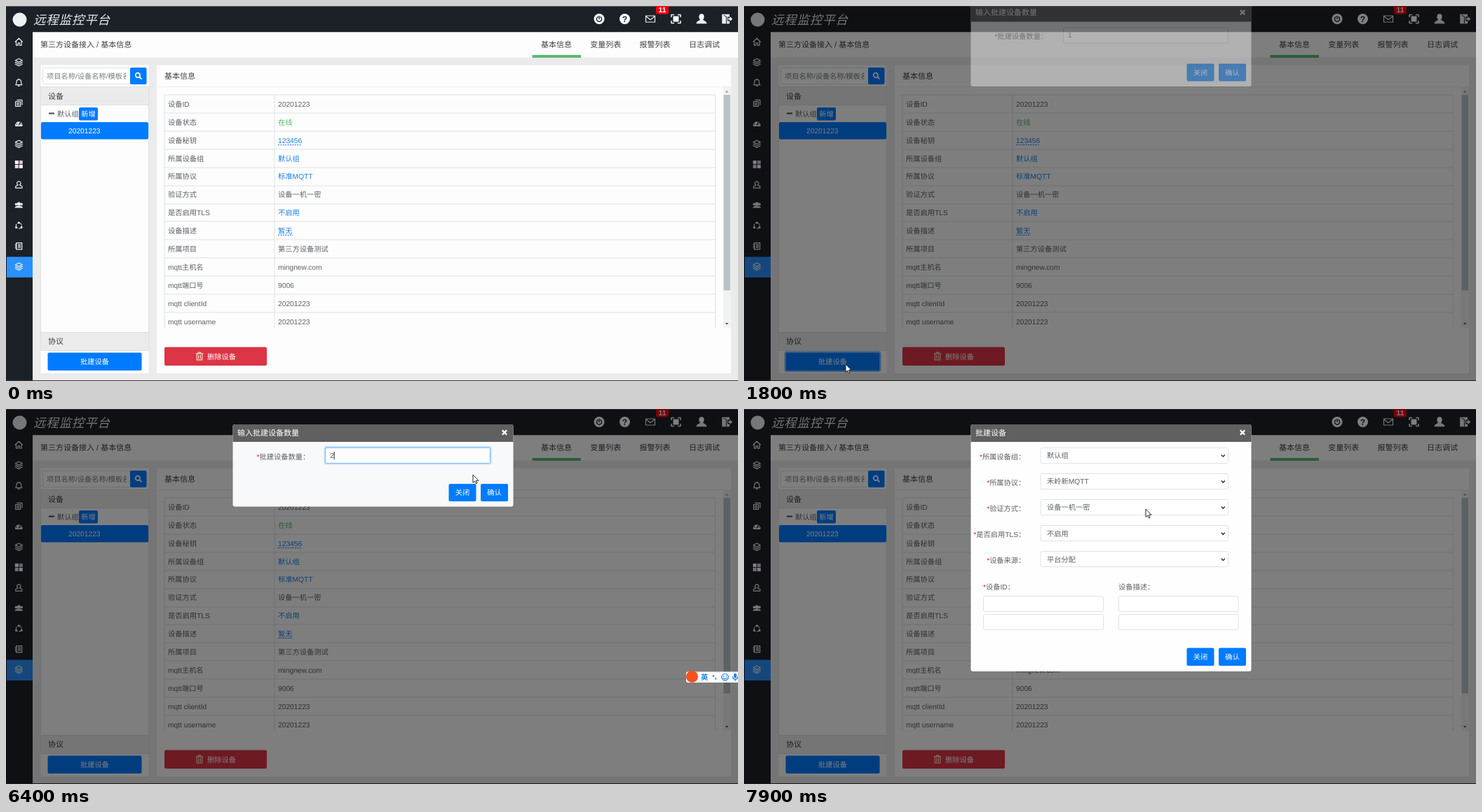
These frames come from a looping animation (1044 by 536 pixels, 8000 ms). An HTML page:

```html
<!DOCTYPE html>
<html lang="zh-CN">
<head>
<meta charset="utf-8">
<title>远程监控平台</title>
<style>
  html, body { margin: 0; width: 100%; height: 100%; overflow: hidden; background: #ebebeb; }
  svg { display: block; width: 1044px; height: 536px; }
  text {
    font: 10.24px "Liberation Sans", "Noto Sans CJK SC", "Noto Sans CJK", sans-serif;
    fill: #5c6065; white-space: pre; text-rendering: geometricPrecision;
  }
  .big { font-size: 11px; fill: #3c4045; }
  .white { fill: #fff; }
  .blue { fill: #1a7fee; }
  .green { fill: #52b96a; }
  .hint { fill: #777c82; }
  .mid { text-anchor: middle; }
  .end { text-anchor: end; }
  .brand { font-size: 17.5px; font-weight: 500; font-style: italic; fill: #e9ebee; letter-spacing: .8px; }
  .bold { font-weight: bold; }
  .line { fill: none; stroke: #eceef0; stroke-width: 1.2; stroke-linejoin: round; stroke-linecap: round; }
  .solid { fill: #eceef0; }
  .dark { fill: none; stroke: #1c2026; stroke-width: 1.4; stroke-linecap: round; }
</style>
</head>
<body>
<svg id="stage" viewBox="0 0 1044 536" xmlns="http://www.w3.org/2000/svg"></svg>
<script>
const LOOP = 8000, TICK = 100;
const BLUE = '#007bff', HOVER = '#0066d4', EDGE = '#dee2e6';

const rect = (x, y, w, h, fill, extra = '') =>
  `<rect x="${x}" y="${y}" width="${w}" height="${h}" fill="${fill}" ${extra}/>`;
const box = (x, y, w, h, fill = '#fff', stroke = EDGE, r = 2) =>
  rect(x + .5, y + .5, w - 1, h - 1, fill, `stroke="${stroke}" rx="${r}"`);
// Text is placed by its left edge and its vertical centre.
const text = (x, cy, str, cls = '') => `<text x="${x}" y="${cy + 3.8}" class="${cls}">${str}</text>`;
const path = (d, cls = 'line', extra = '') => `<path d="${d}" class="${cls}" ${extra}/>`;
const at = (x, y, body) => `<g transform="translate(${x} ${y})">${body}</g>`;
const group = (id, body) => `<g id="${id}">${body}</g>`;
const button = (x, y, w, h, label, fill = BLUE, id = '') =>
  rect(x, y, w, h, fill, `rx="2" ${id && `id="${id}"`}`) + text(x + w / 2, y + h / 2, label, 'white mid');
const ring = (id, x, y, w, h) =>
  rect(x - 1, y - 1, w + 2, h + 2, 'none', `id="${id}" rx="3" stroke="${BLUE}" stroke-opacity=".5" stroke-width="2"`);

const layers = path('M0-5.2L5-2.6 0 0-5-2.6zM-5 0L0 2.6 5 0M-5 2.6L0 5.2 5 2.6');
const sideIcons = [
  path('M-5.2 0L0-5 5.2 0M-3.8-.6V5H-1.2V1.6H1.2V5H3.8V-.6'),
  layers,
  path('M-4.6 3C-3 1.5-3.4-.2-3.2-1.8-2.8-5.4 2.8-5.4 3.2-1.8 3.4-.2 3 1.5 4.6 3zM-1 4.8H1M0-5.4V-4.6'),
  path('M-4.6-2.2H2.2V4.6H-4.6zM-2.4-4.4H4.6V2.4M-1.2-.8V3.2M-3.2 1.2H.8'),
  path('M-5 4A5.2 5.2 0 1 1 5 4z', 'solid') + path('M0 2L2-1.6M-3 1V.8M3 1V.8', 'dark'),
  layers,
  rect(-5.5, -5.5, 5, 5, '#fff') + rect(.5, -5.5, 5, 5, '#d9c3e6') +
    rect(-5.5, .5, 5, 5, '#e6d5ee') + rect(.5, .5, 5, 5, '#fff'),
  path('M0-5A2.6 2.8 0 0 1 1.2 .3L4.6 2.2V4.6H-4.6V2.2L-1.2 .3A2.6 2.8 0 0 1 0-5z'),
  `<circle cy="-2" r="2.6" class="solid"/><circle cx="-3.8" cy="-1.4" r="1.8" class="solid"/>
   <circle cx="3.8" cy="-1.4" r="1.8" class="solid"/>` + path('M-5.8 3.6C-5.6-.4 5.6-.4 5.8 3.6z', 'solid'),
  '<circle r="4" class="line" stroke-dasharray="6 2.4"/>' +
    [[0, -4.2], [-3.8, 2.4], [3.8, 2.4]].map(([x, y]) => `<circle cx="${x}" cy="${y}" r="1.5" class="solid"/>`).join(''),
  path('M-3.6-4.6H4.4V4.6H-3.6zM-5-2.4H-3M-5 0H-3M-5 2.4H-3M-.8-2H2.4M-.8 0H2.4M-.8 2H2.4'),
  layers
];

const topIcons =
  at(846, 18.5, '<circle r="7.5" fill="#fff"/>' + path('M-2-2.8A3.6 3.6 0 1 0 2-2.8M0-4V0', 'dark')) +
  at(882.5, 18.5, '<circle r="7.5" fill="#fff"/><text class="mid bold" y="4.2" style="font-size:12px;fill:#1c2026">?</text>') +
  at(919, 18.5, path('M-6.5-4.5H6.5V4.5H-6.5zM-6.5-4L0 1.2 6.5-4')) +
  at(955.5, 18.5, rect(-4, -4, 8, 8, '#fff') +
    path('M-6.5-3V-6H-3M3-6H6.5V-3M6.5 3V6H3M-3 6H-6.5V3', 'line', 'style="stroke-width:1.6"')) +
  at(992, 18.5, '<ellipse cy="-3" rx="3.6" ry="4.2" fill="#fff"/>' + path('M-7.5 6.8C-7 2.4-3 3-1.8 .5H1.8C3 3 7 2.4 7.5 6.8z', 'solid')) +
  at(1028, 18.5, path('M-6.8-6.8H4V-3H1V3H4V6.8H-6.8zM2-1.2H4.6V-3.6L8.2 0 4.6 3.6V1.2H2z', 'solid') +
    path('M-4-5L-.6-3.5V6', 'dark', 'style="stroke-width:1"')) +
  rect(927, 0, 18, 11.5, '#f5000c', 'rx="2"') + text(936, 5.6, '11', 'white mid bold');

const info = [
  ['设备ID', '20201223'], ['设备状态', '在线', 'green'], ['设备秘钥', '123456', 'blue', 34],
  ['所属设备组', '默认组', 'blue'], ['所属协议', '标准MQTT', 'blue'], ['验证方式', '设备一机一密'],
  ['是否启用TLS', '不启用', 'blue'], ['设备描述', '暂无', 'blue', 21], ['所属项目', '第三方设备测试'],
  ['mqtt主机名', 'mingnew.com'], ['mqtt端口号', '9006'], ['mqtt clientId', '20201223'], ['mqtt username', '20201223']
];
const infoRow = ([name, value, cls = '', dash], i) => {
  const y = 127 + i * 25.92, cy = y + 13;
  return rect(226, Math.round(y) - .5, 786, 1, EDGE) + text(231, cy, name) + text(388, cy, value, cls) +
    (dash ? path(`M388 ${Math.round(cy) + 6.5}h${dash}`, '', `stroke="${BLUE}" stroke-dasharray="2 1.4"`) : '');
};

const page =
  rect(0, 0, 1044, 536, '#ebebeb') +
  rect(0, 0, 1044, 37.5, '#1c2128') + rect(0, 0, 1044, 1, '#5d6167') + rect(0, 37, 38, 499, '#1c2128') +
  '<circle cx="19.5" cy="19.5" r="10" fill="#eef0f2"/>' + text(39, 22, '远程监控平台', 'brand') + topIcons +
  rect(1, 358.5, 37, 29.5, '#2a90fb') +
  sideIcons.map((icon, i) => at(18.3, 51.2 + i * 29.2, icon)).join('') +
  rect(38, 37.5, 1006, 36, '#fdfdfd') +
  text(49, 55, '第三方设备接入 / 基本信息', 'big') +
  ['基本信息', '变量列表', '报警列表', '日志调试'].map((s, i) => text(763 + i * 70.3, 55, s, 'big')).join('') +
  rect(750.5, 70, 69.5, 4, '#5bb974') +
  // device list
  rect(49.5, 84.5, 154, 440.5, '#fdfdfd') +
  box(52, 88, 126, 24) + '<g clip-path="url(#hint)">' + text(58, 100, '项目名称/设备名称/模板名', 'hint') + '</g>' +
  rect(177, 88, 23.5, 24, BLUE, 'rx="2"') +
  at(188.5, 99.5, path('M2.2 2.2L4.4 4.4', 'line', 'style="stroke-width:2;stroke:#fff"') +
    '<circle cx="-.6" cy="-.6" r="3.2" fill="none" stroke="#fff" stroke-width="1.7"/>') +
  box(49, 115, 155, 352, '#fdfdfd', EDGE, 0) +
  box(49, 115, 155, 27, '#ebebeb', '#dcdfe2', 0) + text(60, 129, '设备', 'big') +
  rect(61, 152.5, 8, 2, '#44494f') + text(73, 154, '默认组') +
  rect(104, 145, 27, 18.5, BLUE, 'rx="2"') + text(117.5, 154.2, '新增', 'white mid') +
  rect(50, 166, 153, 24.5, BLUE, 'rx="2"') + text(89, 178.2, '20201223', 'white') +
  box(49, 466, 155, 27, '#ebebeb', '#dcdfe2', 0) + text(60, 479.5, '协议', 'big') +
  button(59.5, 495.5, 134, 25.5, '批建设备', BLUE, 'batch') + ring('batchRing', 59.5, 495.5, 134, 25.5) +
  // details
  rect(215, 84.5, 819, 440.5, '#fdfdfd') + rect(215, 115, 819, 1, '#eceef0') + text(226, 100, '基本信息', 'big') +
  '<g clip-path="url(#table)">' + info.map(infoRow).join('') +
  [225.5, 382.5, 1011].map(x => rect(x, 127, 1, 340, EDGE)).join('') + '</g>' +
  rect(1023, 116, 11, 344, '#f1f2f2') + rect(1023.5, 127, 9.5, 279.5, '#b9c3c7') +
  path('M1025.8 123.5h4.6l-2.3-2.6z', '', 'fill="#8a8f93"') + path('M1025.8 453h4.6l-2.3 2.6z', '', 'fill="#44484c"') +
  rect(226, 487.5, 146, 26.5, '#dc3545', 'rx="2"') + text(287, 501, '删除设备', 'white') +
  at(276, 500.5, path('M-4.8-3.6H4.8M-1.8-3.8V-5.4H1.8V-3.8M-3.8-3.4V5.4H3.8V-3.4M-1.4-1.4V3.4M1.4-1.4V3.4',
    'line', 'style="stroke:#ffd9c8"')) +
  rect(0, 535, 1044, 1, '#3a3035');

const frame = (h, title, fill) =>
  rect(323.5, 22, 400, h, fill, 'rx="3"') +
  path('M323.5 47V25a3 3 0 0 1 3-3H720.5a3 3 0 0 1 3 3V47z', '', 'fill="#606060"') +
  text(330, 34, title, 'big white') +
  path('M707.8 30.4l6.4 6.4m0-6.4l-6.4 6.4', '', 'stroke="#fff" stroke-width="2.2" fill="none"');
const star = '<tspan fill="#f01c1c">*</tspan>';

const countModal =
  frame(117.5, '输入批建设备数量', '#f8f9fb') + text(357.5, 68, star + '批建设备数量：') +
  rect(453.5, 53, 239, 26.5, '#bfdeff', 'id="glow" rx="4"') +
  rect(455.5, 55.5, 235, 22, '#fdfdfe', 'id="field" rx="2"') +
  '<text id="count" x="462" y="69.8"></text>' + rect(467.6, 61, 1, 11, '#222', 'id="caret"') +
  button(631.5, 107, 39, 25, '关闭') + button(677, 107, 39, 25, '确认', BLUE, 'ok') + ring('okRing', 677, 107, 39, 25);

const fields = [
  ['所属设备组', '默认组'], ['所属协议', '禾岭新MQTT'], ['验证方式', '设备一机一密'],
  ['是否启用TLS', '不启用'], ['设备来源', '平台分配']
];
const batchModal =
  frame(353, '批建设备', '#fefefe') +
  fields.map(([name, value], i) => {
    const y = i * 37.1;
    return text(401.3, 68 + y, star + name + '：', 'end') + box(422.5, Math.round(55 + y), 268.5, 23) +
      text(432, 66.4 + y, value) +
      path(`M680.8 ${65.4 + y}l2.5 2.6 2.5-2.6`, '', 'fill="none" stroke="#333" stroke-width="1.5"');
  }).join('') +
  text(341, 254, star + '设备ID：') + text(534, 254, '设备描述：') +
  [267, 293].map(y => box(341, y, 172, 23) + box(534, y, 171.5, 23)).join('') +
  button(631.5, 341.5, 39, 25.5, '关闭') + button(677, 341.5, 39, 25.5, '确认');

const ime =
  rect(970, 375.5, 80, 15.5, '#fdfdfe', 'rx="3"') + '<circle cx="978.5" cy="382.5" r="8.5" fill="#f4511e"/>' +
  text(991, 383, '英', 'blue bold') + '<circle cx="1009" cy="381.5" r="1.3" fill="#1a7fee"/>' +
  path('M1012.5 384q.4 1.8-1 2.8', '', 'fill="none" stroke="#1a7fee" stroke-width="1.4"') +
  at(1025.5, 383.3, path('M-2.6 1Q0 4 2.6 1M-1.8-1.6v.6M1.8-1.6v.6', 'line', 'style="stroke:#1a7fee"') +
    '<circle r="4.8" fill="none" stroke="#1a7fee" stroke-width="1.2"/>') +
  rect(1038, 378, 4, 6.5, '#1a7fee', 'rx="2"') +
  path('M1036.4 382.5q0 3.6 3.6 3.6t3.6-3.6M1040 386v2.4', 'line', 'style="stroke:#1a7fee"');

const pointers =
  group('arrow', path('M0 0V11.4L2.6 9 4.3 12.8 6 12 4.4 8.3H8z', '', 'fill="#fff" stroke="#111" stroke-width=".9"')) +
  group('beam', path('M-2.2-5.5H-.6L0-5 .6-5.5H2.2M0-5V5M-2.2 5.5H-.6L0 5 .6 5.5H2.2', '', 'fill="none" stroke="#333"')) +
  group('hand', path('M-1.2 1Q0-.6 1.2 1V5L4.8 5.8Q6 6 6 7.4L5.2 11.4V13.4H-1.6V11.8L-4.4 7.8Q-4-.0 -1.2 8z'.replace('Q-4-.0 -1.2 8', 'Q-3.6 6.4-1.2 8'),
    '', 'fill="#fff" stroke="#111" stroke-width=".9" stroke-linejoin="round"'));

document.getElementById('stage').innerHTML =
  `<defs><clipPath id="hint">${rect(54, 88, 117.5, 24, '#000')}</clipPath>
   <clipPath id="table">${rect(215, 116, 808, 344, '#000')}</clipPath></defs>` +
  page + rect(0, 0, 1044, 536, '#000', 'id="dim"') + group('first', countModal) + group('second', batchModal) +
  group('ime', ime) + pointers;

const el = {};
document.querySelectorAll('#stage [id]').forEach(n => el[n.id] = n);

// Rows: time, then values.
const cursor = [
  [700, 1010, 36], [900, 567, 296], [1100, 168, 527], [1300, 150, 516], [1500, 145, 512], [1900, 145, 512],
  [2400, 391, 215], [2700, 443, 120], [2900, 482, 66], [3300, 482, 66], [3500, 463.5, 66.5], [6000, 463.5, 66.5],
  [6100, 490, 68], [6300, 630, 86], [6400, 666, 94], [6600, 688, 112], [6800, 695, 117.5],
  [7700, 695, 117.5], [7800, 648, 134], [7900, 573, 143]
];
const shade = [[1600, 0], [1700, .3], [1800, .5]];
const firstPose = [[1700, 0, -50], [1800, .42, -24.5], [1900, .95, -5], [2000, 1, 0], [7200, 1, 0], [7300, .6, -8], [7400, 0, -30]];
const secondPose = [[7400, 0, -50], [7500, .42, -24.5], [7600, .95, -5], [7700, 1, 0]];

function sample(rows, t) {
  const i = rows.findIndex(r => r[0] > t);
  if (i === 0) return rows[0].slice(1);
  if (i < 0) return rows[rows.length - 1].slice(1);
  const a = rows[i - 1], b = rows[i], k = (t - a[0]) / (b[0] - a[0]);
  return a.slice(1).map((v, j) => v + (b[j + 1] - v) * k);
}
const show = (node, on) => node.setAttribute('visibility', on ? 'inherit' : 'hidden');
const move = (node, x, y) => node.setAttribute('transform', `translate(${x} ${y})`);

function pose(node, rows, t) {
  const [alpha, dy] = sample(rows, t);
  node.setAttribute('opacity', alpha);
  move(node, 0, dy);
}

function draw(t) {
  const within = (a, b) => t >= a && t < b;
  el.dim.setAttribute('opacity', sample(shade, t)[0]);
  pose(el.first, firstPose, t);
  pose(el.second, secondPose, t);

  el.batch.setAttribute('fill', within(1100, 1700) ? HOVER : BLUE);
  show(el.batchRing, within(1700, 2900));
  el.ok.setAttribute('fill', within(6600, 8000) ? HOVER : BLUE);
  show(el.okRing, within(7200, 8000));

  const focus = within(2900, 7200);
  show(el.glow, focus);
  el.field.setAttribute('stroke', focus ? '#80bdff' : '#ced4da');
  show(el.ime, focus);
  el.count.textContent = t < 3400 ? '1' : t < 3500 ? '' : '2';
  show(el.caret, within(4400, 7200) && Math.floor((t - 4400) / 500) % 2 === 0);

  const kind = t < 700 ? '' : within(2900, 6300) ? 'beam' : within(6600, 7800) ? 'hand' : 'arrow';
  const [x, y] = sample(cursor, t);
  for (const name of ['arrow', 'beam', 'hand']) {
    show(el[name], name === kind);
    move(el[name], x, y);
  }
}

const start = performance.now();
function tick(now) {
  const t = Math.max(0, now - start) % LOOP;
  draw(Math.floor(t / TICK) * TICK);
  requestAnimationFrame(tick);
}
draw(0);
requestAnimationFrame(tick);
</script>
</body>
</html>
```
